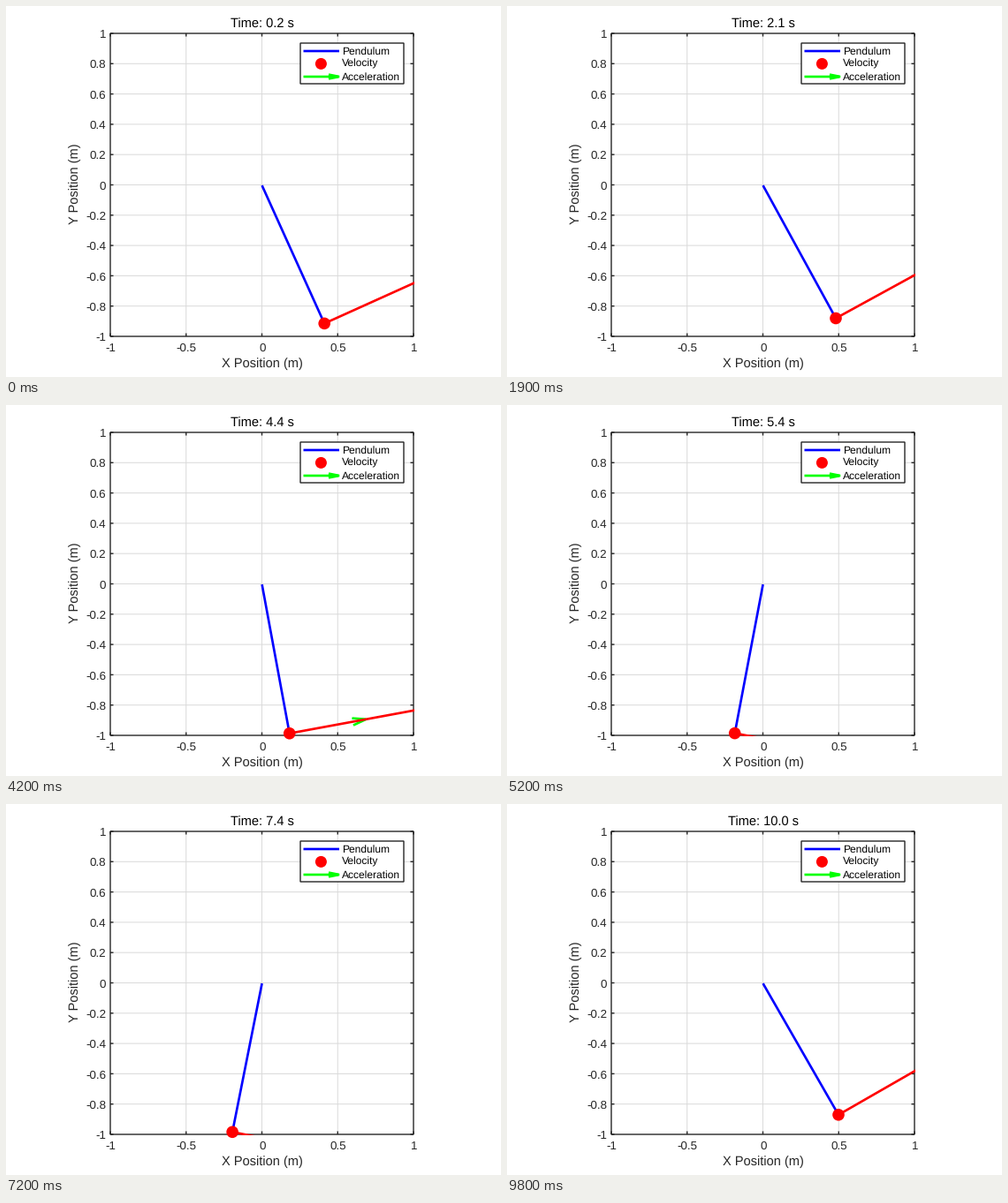
Animation, 560 px wide and 420 px high, one loop 9900 ms. Source, as a matplotlib script:

```python
import numpy as np
import matplotlib.pyplot as plt
from matplotlib.animation import FuncAnimation
from matplotlib.patches import Circle, Rectangle

W, H, DPI = 560, 420, 100
PX = 72 / DPI                      # one pixel in points
CX, CY, R = 289.6, 203.1, 171.5    # pivot and pixels per metre
LEFT, RIGHT, TOP, BOTTOM = 118, 461, 31, 374
DARK, GRID = "#262626", "#dadada"
THIN, THICK = 1.4 * PX, 2.67 * PX

G, LENGTH, THETA0 = 9.81, 1.0, np.pi / 6
SCALE = 0.9                        # arrow scale
FRAMES, INTERVAL = 99, 100

plt.rcParams["font.family"] = "Liberation Sans"
plt.rcParams["text.hinting"] = "none"
fig = plt.figure(figsize=(W / DPI, H / DPI), dpi=DPI, facecolor="white")
ax = fig.add_axes([0, 0, 1, 1])
ax.set_xlim(0, W)
ax.set_ylim(H, 0)
ax.axis("off")
clip = Rectangle((LEFT, TOP), 344, 343.5, transform=ax.transData)


def line(xs, ys, color, width=THIN, z=1.0):
    return ax.plot(xs, ys, color=color, lw=width, zorder=z, snap=False,
                   solid_capstyle="butt", solid_joinstyle="miter")[0]


def frame(x0, y0, x1, y1, fill, z):
    ax.add_patch(Rectangle((x0, y0), x1 - x0, y1 - y0, fc=fill, ec=DARK,
                           lw=THIN, zorder=z, snap=False))


def text(x, y, s, size, color=DARK, ha="center", rotation=0, z=3):
    return ax.text(x, y, s, fontsize=size * PX, color=color, ha=ha,
                   va="baseline", rotation=rotation,
                   rotation_mode="anchor", zorder=z)


def draw_axes():
    tick = 3.5
    for v, x in zip(np.linspace(-1, 1, 5), np.linspace(LEFT, RIGHT, 5)):
        if abs(v) < 1:
            line([x, x], [TOP, BOTTOM], GRID, PX, 0.5)
        line([x, x], [TOP, TOP + tick], DARK)
        line([x, x], [BOTTOM, BOTTOM - tick], DARK)
        text(x + 0.5, 391, f"{v:g}", 13.33)
    for k, y in zip(range(-5, 6), np.linspace(BOTTOM, TOP, 11)):
        if abs(k) < 5:
            line([LEFT, RIGHT], [y, y], GRID, PX, 0.5)
        line([LEFT, LEFT + tick], [y, y], DARK)
        line([RIGHT, RIGHT - tick], [y, y], DARK)
        text(113, y + 5, f"{k / 5:g}", 13.33, ha="right")
    frame(LEFT, TOP, RIGHT, BOTTOM, "none", 1)
    text(290, 409, "X Position (m)", 14.67)
    text(82, 201, "Y Position (m)", 14.67, rotation=90)


def draw_legend():
    frame(333, 42, 450, 88, "white", 8)
    line([336.5, 377], [51, 51], "blue", THICK, 9)
    ax.add_patch(Circle((356.4, 65.4), 6.5, fc="red", lw=0, zorder=9))
    line([336.5, 376], [80, 80], "lime", THICK, 9)
    line([365, 377, 365], [77.6, 80, 82.4], "lime", THICK, 9)
    for y, name in zip((55, 69, 84), ("Pendulum", "Velocity", "Acceleration")):
        text(380, y, name, 12, "black", ha="left", z=10)


class Arrow:
    """Shaft with an open two-stroke head, clipped to the plot area."""

    def __init__(self, color, z, shaft_width=THICK):
        self.shaft = line([], [], color, shaft_width, z)
        self.head = line([], [], color, THICK, z)
        for part in (self.shaft, self.head):
            part.set_clip_path(clip)

    def set(self, start, vec):
        tip = start + vec
        back = tip - 0.175 * vec
        side = 0.046 * np.array([-vec[1], vec[0]])
        self.shaft.set_data(*np.transpose([start, tip]))
        self.head.set_data(*np.transpose([back + side, tip, back - side]))


draw_axes()
draw_legend()
title = text(290, 25, "", 14.67, "black")
rod = line([], [], "blue", THICK, 3)
bob = ax.add_patch(Circle((CX, CY), 6.8, fc="red", lw=0, zorder=4))
# The thin shaft stays fully hidden under the longer red one.
speed_arrow = Arrow("lime", 5, PX / 2)
accel_arrow = Arrow("red", 6)


def update(i):
    t = 0.2 + 0.1 * i
    theta = THETA0 * np.cos(np.sqrt(G / LENGTH) * t)
    pos = np.array([CX + R * LENGTH * np.sin(theta),
                    CY + R * LENGTH * np.cos(theta)])
    tangent = R * SCALE * np.array([np.cos(theta), -np.sin(theta)])
    speed = np.sqrt(2 * G * LENGTH * (1 - np.cos(theta)))

    title.set_text(f"Time: {t:.1f} s")
    rod.set_data([CX, pos[0]], [CY, pos[1]])
    bob.center = tuple(pos)
    speed_arrow.set(pos, speed * tangent)
    accel_arrow.set(pos, G * np.cos(theta) * tangent)
    return title, rod, bob


anim = FuncAnimation(fig, update, frames=FRAMES, interval=INTERVAL,
                     repeat=True, repeat_delay=0, blit=False)
plt.show()
```
